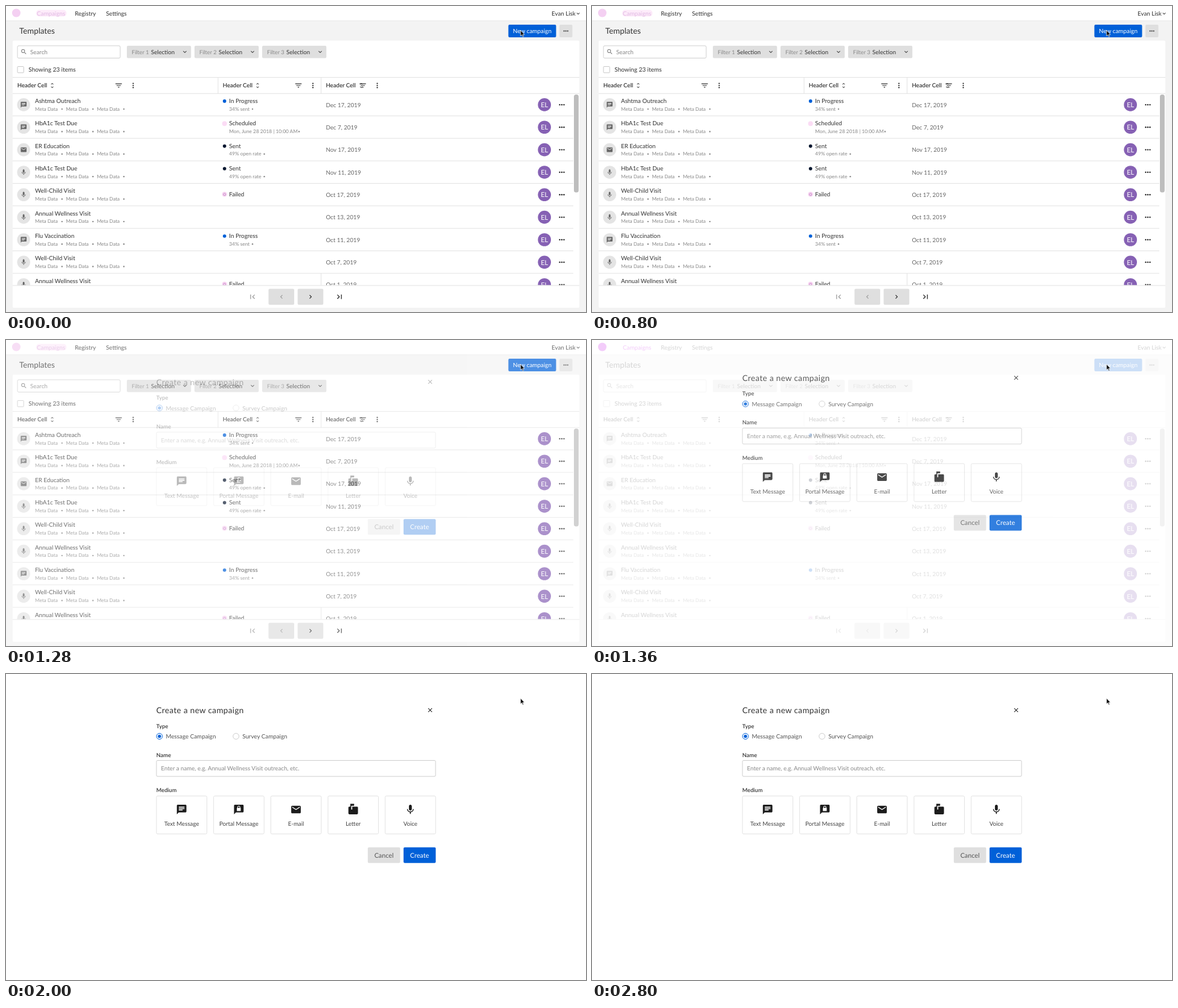
These frames come from a looping animation (960 by 508 pixels, 2.88 s). An HTML page:

```html
<!DOCTYPE html>
<html lang="en">
<head>
<meta charset="utf-8">
<title>Campaign templates</title>
<style>
  @property --p { syntax: "<number>"; inherits: true; initial-value: 0; }
  html, body { margin: 0; width: 100%; height: 100%; overflow: hidden; background: #fff; }
  svg { display: block; width: 960px; height: 508px; }
  text { font-family: Lato, "Open Sans", sans-serif; text-rendering: geometricPrecision; white-space: pre; }

  /* One 80 ms tick is 2.7778% of the loop. */
  #modal { animation: open 2880ms step-end infinite; opacity: var(--p); }
  #dialog { transform: translateY(calc((1 - var(--p)) * 13.5px)); }
  @keyframes open {
    0% { --p: 0; }
    38.88% { --p: .04; }
    41.66% { --p: .11; }
    44.44% { --p: .3; }
    47.22% { --p: .8; }
    50% { --p: .94; }
    52.77% { --p: .985; }
    55.55%, 100% { --p: 1; }
  }
  .accent { fill: #f4d0f2; animation: accent 2880ms step-end infinite; }
  .tab { fill: #e0b9e2; }
  .glow { fill: #fdebfa; animation: glow 2880ms step-end infinite; }
  @keyframes accent { 47.22%, 99.99% { fill: #c400e6; } }
  @keyframes glow { 47.22%, 99.99% { fill: #fff; } }
</style>
</head>
<body>
<svg viewBox="0 0 960 508">
  <defs><clipPath id="list"><rect x="11" y="145" width="938" height="318.5"/></clipPath></defs>
  <g id="page"></g>
  <g id="modal"><rect width="960" height="508" fill="#fff"/><g id="dialog"></g></g>
  <path d="M851.6 40.2v9.6l2.2-2 1.5 3.4 1.5-.7-1.5-3.2h2.9z" fill="#111" stroke="#fff" stroke-width=".7"/>
</svg>
<script>
const INK = '#333', GREY = '#888', LINE = '#e2e2e2', BTN = '#dfdfdf', BLUE = '#0060d8';

const bubble = 'M20 2H4c-1.1 0-2 .9-2 2v18l4-4h14c1.1 0 2-.9 2-2V4c0-1.1-.9-2-2-2z';
const ICONS = {
  chat: bubble + 'M6 9h12v2H6zM6 12h8v2H6zM6 6h12v2H6z',
  portal: bubble + 'M8 8.5h1V7a3 3 0 0 1 6 0v1.5h1V15H8zM10.3 8.5h3.4V7a1.7 1.7 0 0 0-3.4 0z',
  mail: 'M20 4H4c-1.1 0-2 .9-2 2v12c0 1.1.9 2 2 2h16c1.1 0 2-.9 2-2V6c0-1.1-.9-2-2-2zm0 4l-8 5-8-5V6l8 5 8-5z',
  letter: 'M20 6H10v6H8V4h6V0H6v6H4c-1.1 0-2 .9-2 2v12c0 1.1.9 2 2 2h16c1.1 0 2-.9 2-2V8c0-1.1-.9-2-2-2z',
  mic: 'M12 14c1.66 0 3-1.34 3-3V5c0-1.66-1.34-3-3-3S9 3.34 9 5v6c0 1.66 1.34 3 3 3zm5.3-3c0 3-2.54 5.1-5.3 5.1S6.7 14 6.7 11H5c0 3.41 2.72 6.23 6 6.72V21h2v-3.28c3.28-.48 6-3.3 6-6.72z',
  filter: 'M10 18h4v-2h-4zM3 6v2h18V6zM6 13h12v-2H6z',
  sort: 'M12 5.83L15.17 9l1.41-1.41L12 3 7.41 7.59 8.83 9zM12 18.17L8.83 15l-1.41 1.41L12 21l4.59-4.59L15.17 15z',
  down: 'M16.59 8.59L12 13.17 7.41 8.59 6 10l6 6 6-6z',
  search: 'M15.5 14h-.79l-.28-.27A6.47 6.47 0 0 0 16 9.5 6.5 6.5 0 1 0 9.5 16c1.61 0 3.09-.59 4.23-1.57l.27.28v.79l5 4.99L20.49 19zM9.5 14a4.5 4.5 0 1 1 0-9 4.5 4.5 0 0 1 0 9z',
  first: 'M18.41 16.59L13.82 12l4.59-4.59L17 6l-6 6 6 6zM6 6h2v12H6z',
  prev: 'M15.41 7.41L14 6l-6 6 6 6 1.41-1.41L10.83 12z',
  next: 'M10 6L8.59 7.41 13.17 12l-4.58 4.59L10 18l6-6z',
  last: 'M5.59 7.41L10.18 12l-4.59 4.59L7 18l6-6-6-6zM16 6h2v12h-2z',
  close: 'M19 6.41L17.59 5 12 10.59 6.41 5 5 6.41 10.59 12 5 17.59 6.41 19 12 13.41 17.59 19 19 17.59 13.41 12z'
};

// x is the left edge (or the anchor), y the middle of the capitals
const text = (x, y, str, size = 9.8, fill = INK, extra = '') =>
  `<text x="${x}" y="${y + size * .36}" font-size="${size}" fill="${fill}" ${extra}>${str}</text>`;
const MID = 'text-anchor="middle"', BOLD = 'font-weight="600"';
const box = (x, y, w, h, fill, extra = '') =>
  `<rect x="${x}" y="${y}" width="${w}" height="${h}" fill="${fill}" ${extra}/>`;
const frame = (x, y, w, h, stroke, r = 2) => box(x, y, w, h, '#fff', `rx="${r}" stroke="${stroke}"`);
const dot = (x, y, r, fill, extra = '') => `<circle cx="${x}" cy="${y}" r="${r}" fill="${fill}" ${extra}/>`;
const icon = (name, x, y, size, fill = INK) =>
  `<path transform="translate(${x - size / 2} ${y - size / 2}) scale(${size / 24})" d="${ICONS[name]}" fill="${fill}" fill-rule="evenodd"/>`;
const hline = (y, x2, fill = LINE) => box(11, y, x2 - 11, 1, fill);
const dots = (x, y, dx, dy, r = 1.2) =>
  [-1, 0, 1].map(k => dot(x + k * dx, y + k * dy, r, '#222')).join('');

function topBar() {
  return box(0, 0, 960, 508, '#f3f3f3') + box(0, 0, 960, 24.5, '#fff') + box(0, 24, 960, 1, '#e9e9e9') +
    '<circle class="accent" cx="17" cy="11.5" r="7"/>' +
    '<rect class="glow" x="50" y="6.5" width="50" height="11" rx="5"/>' +
    text(51, 12.5, 'Campaigns', 9.8, '', 'class="accent tab"') +
    text(114, 12.5, 'Registry') + text(165.5, 12.5, 'Settings') +
    text(903, 12.5, 'Evan Lisk') + icon('down', 947, 12.5, 10) +
    text(22, 41.7, 'Templates', 13.3) +
    box(831.5, 31, 79, 21, BLUE, 'rx="2"') + text(871, 41.7, 'New campaign', 9.9, '#fff', MID) +
    box(916, 31, 21.5, 21, BTN, 'rx="2"') + dots(926.7, 41.5, 3, 0, 1);
}

function tools() {
  let s = box(11, 57.5, 938, 443.5, '#fff', 'rx="2"') +
    frame(19, 66, 170, 20.5, '#cfcfcf') + icon('search', 29.5, 76, 11.5, '#777') + text(40, 76.3, 'Search', 9.8, GREY);
  for (let i = 0; i < 3; i++) {
    const x = 200 + i * 112;
    s += box(x, 66, 106.3, 20.5, BTN, 'rx="2"') + text(x + 8, 76.3, 'Filter ' + (i + 1), 9.2, GREY) +
      text(x + 40, 76.3, 'Selection', 9.7) + icon('down', x + 96, 76.2, 11.5);
  }
  return s + frame(19, 100.5, 10.3, 10.3, '#c8c8c8', 1) + text(37.3, 105.6, 'Showing 23 items', 10);
}

function header() {
  const cell = (x, sort, filter, more) => text(x, 132, 'Header Cell', 9.6, INK, BOLD) +
    icon('sort', sort, 132, 11.5) + icon('filter', filter, 132, 14) + dots(more, 132, 0, 3.4, 1.1);
  return hline(118, 949) + hline(144.8, 949) +
    box(350.5, 118, 1, 27, LINE) + box(521, 118, 1, 27, LINE) +
    cell(18.7, 76.5, 186.5, 210.5) + cell(358.7, 416.5, 484, 508) + cell(529.4, 588, 590.5, 614.5);
}

const STATUS = {
  progress: ['In Progress', '#0060d8', '34% sent', 408],
  scheduled: ['Scheduled', '#fbdcf5', 'Mon, June 28 2018 | 10:00 AM', 485],
  sent: ['Sent', '#0a1830', '49% open rate', 427.5],
  failed: ['Failed', '#f7d2f1']
};
const ROWS = [
  ['chat', 'Ashtma Outreach', 'progress', 'Dec 17'],
  ['chat', 'HbA1c Test Due', 'scheduled', 'Dec 7'],
  ['mail', 'ER Education', 'sent', 'Nov 17'],
  ['mic', 'HbA1c Test Due', 'sent', 'Nov 11'],
  ['mic', 'Well-Child Visit', 'failed', 'Oct 17'],
  ['mic', 'Annual Wellness Visit', '', 'Oct 13'],
  ['chat', 'Flu Vaccination', 'progress', 'Oct 11'],
  ['mic', 'Well-Child Visit', '', 'Oct 7'],
  ['mic', 'Annual Wellness Visit', 'failed', 'Oct 1']
];

function status(key, y) {
  if (!key) return '';
  const [label, color, sub, end] = STATUS[key];
  const ly = sub ? y - 6.4 : y - 1.3;
  const big = key == 'failed' || key == 'scheduled';
  return dot(361.7, ly + .4, big ? 4 : 2.8, color) +
    (key == 'failed' ? dot(361.7, ly + .8, 1.9, 'none', 'stroke="#c793cb"') : '') +
    text(369.3, ly, label) +
    (sub ? text(369.3, y + 6.8, sub, 8.3, GREY) + dot(end, y + 7.2, 1.2, GREY) : '');
}

function row([type, title, state, date], i) {
  const y = 163.9 + i * 37.35;
  let s = dot(29.2, y, 10.8, '#e4e4e4') + icon(type, 29.2, y, 11.5, '#666') + text(48, y - 6.4, title);
  for (let k = 0; k < 3; k++)
    s += text(48 + k * 51.2, y + 6.8, 'Meta Data', 8.15, GREY) + dot(92.7 + k * 51.2, y + 7.2, 1.2, GREY);
  return s + status(state, y) + text(529.4, y + .2, date + ', 2019', 9.7, '#666') +
    dot(891.2, y, 10.8, '#8661b4') + text(891.2, y + .2, 'EL', 11, '#fff', MID) +
    dots(920, y, 3.5, 0) + hline(y + 18, 939);
}

function pager() {
  return hline(463.5, 949) +
    box(434.5, 469.5, 42.5, 26.5, BTN, 'rx="2"') + box(482.7, 469.5, 42.5, 26.5, BTN, 'rx="2"') +
    icon('first', 408, 482.7, 15, '#999') + icon('prev', 456, 482.7, 13, '#999') +
    icon('next', 504, 482.7, 13, '#222') + icon('last', 552, 482.7, 15, '#222');
}

function dialog() {
  const cards = [['chat', 'Text Message'], ['portal', 'Portal Message'], ['mail', 'E-mail'], ['letter', 'Letter'], ['mic', 'Voice']];
  return text(248.7, 60.3, 'Create a new campaign', 13.5, INK, 'letter-spacing=".35"') + icon('close', 702, 60, 12, '#222') +
    text(248.8, 86.5, 'Type', 9.2, INK, BOLD) +
    dot(254, 103.4, 4.9, '#fff', `stroke="${BLUE}"`) + dot(254, 103.4, 2.7, BLUE) +
    text(264.5, 103.7, 'Message Campaign', 9.8, '#555') +
    dot(380.7, 103.4, 4.9, '#fff', 'stroke="#ccc"') + text(391.2, 103.7, 'Survey Campaign', 9.8, '#555') +
    text(248.8, 134.3, 'Name', 9.3, INK, BOLD) + frame(249, 143.5, 462, 26.5, '#cdcdcd') +
    text(256.6, 156.9, 'Enter a name, e.g. Annual Wellness Visit outreach, etc.', 9.7, GREY) +
    text(248.8, 193, 'Medium', 9.2, INK, BOLD) +
    cards.map(([name, label], i) => {
      const x = 249 + i * 94.65;
      return frame(x, 202.5, 83.5, 63, LINE) + icon(name, x + 41.7, 225, 19, '#1c1c1c') +
        text(x + 41.7, 249, label, 9.7, '#444', MID);
    }).join('') +
    box(598.8, 287.8, 53.6, 26, BTN, 'rx="2"') + text(625.6, 300.8, 'Cancel', 10.8, '#555', MID) +
    box(658, 287.8, 53.3, 26, BLUE, 'rx="2"') + text(684.5, 300.8, 'Create', 10.8, '#fff', MID);
}

document.getElementById('page').innerHTML = topBar() + tools() + header() +
  `<g clip-path="url(#list)">${ROWS.map(row).join('')}${box(521, 444, 1, 20, LINE)}</g>` +
  box(940, 147, 7.8, 162.5, '#bdbdbd', 'rx="3.5"') + pager();
document.getElementById('dialog').innerHTML = dialog();
</script>
</body>
</html>
```
